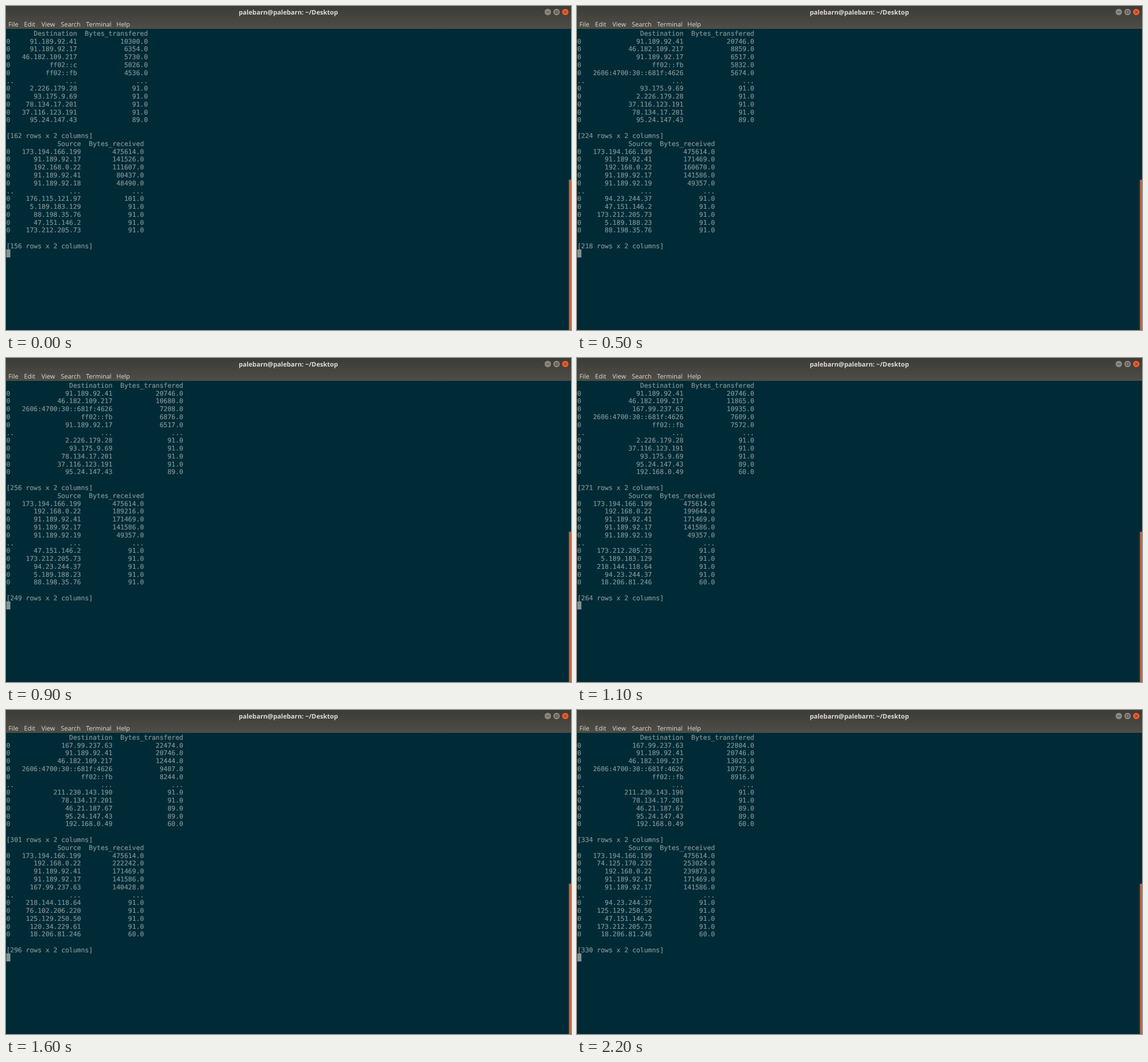
Write an HTML page that moves like this. It is 989 px wide and 567 px high and loops after 2.3 s.

```html
<!DOCTYPE html>
<html lang="en">
<head>
<meta charset="utf-8">
<title>Terminal</title>
<style>
  html, body { margin: 0; width: 100%; height: 100%; overflow: hidden; background: #002b36; }
  svg { position: absolute; left: 0; top: 0; }
  svg text { font: 11px "Open Sans", "Noto Sans", sans-serif; fill: #dfdbd2; text-rendering: geometricPrecision; }
  svg .title { font-weight: 700; font-size: 11.2px; text-anchor: middle; }
  pre {
    position: absolute; left: .4px; top: 41.9px; margin: 0; color: #839496;
    font: 11.44px/13.78px "DejaVu Sans Mono", monospace;
    text-rendering: geometricPrecision;
    -webkit-text-stroke: .2px #839496;
  }
</style>
</head>
<body>
<svg width="989" height="567" viewBox="0 0 989 567">
  <defs>
    <linearGradient id="bar" x1="0" y1="0" x2="0" y2="1">
      <stop offset="0" stop-color="#3c3b37"/>
      <stop offset="1" stop-color="#4f4d46"/>
    </linearGradient>
  </defs>
  <rect width="989" height="40" fill="url(#bar)"/>
  <text class="title" x="494.3" y="14.8">palebarn@palebarn: ~/Desktop</text>
  <g transform="translate(0 35.5)">
    <text x="4.2">File</text>
    <text x="31.6">Edit</text>
    <text x="62">View</text>
    <text x="96">Search</text>
    <text x="140">Terminal</text>
    <text x="193.3">Help</text>
  </g>
  <g stroke="#33322e" stroke-width=".8">
    <circle cx="948.4" cy="10.6" r="6.2" fill="#8b887e"/>
    <circle cx="963.7" cy="10.6" r="6.2" fill="#8b887e"/>
    <circle cx="979" cy="10.6" r="6.2" fill="#ea5a2a"/>
  </g>
  <g stroke="#3c3b37" fill="none">
    <path d="M945.8 10.6h5.2M961.4 8.7h4.6v3.8h-4.6z"/>
    <path d="M977.1 8.7l3.8 3.8m0-3.8l-3.8 3.8"/>
  </g>
  <rect x="985.3" y="304" width="3.7" height="263" fill="#c6623a"/>
  <rect x=".6" y="426" width="7" height="14" fill="#839496"/>
</svg>
<pre id="out"></pre>
<script>
const STEP = 100, LOOP = 2300;
const keys = [0, 5, 7, 11, 14, 18, 22];

// Hosts with byte totals at each key step; a short list holds its last value.
const sent = {
  heads: ["Destination", "Bytes_transfered"],
  rows: [162, 224, 240, 271, 288, 314, 334],
  top: {
    "91.189.92.41": [10300, 20746],
    "91.189.92.17": [6354, 6517],
    "46.182.109.217": [5730, 8859, 9495, 11865, 11927, 12961, 13023],
    "ff02::c": [5026],
    "ff02::fb": [4536, 5832, 6180, 7572, 7920, 8568, 8916],
    "2606:4700:30::681f:4626": [4400, 5674, 6807, 7609, 8455, 10359, 10775],
    "167.99.237.63": [0, 0, 0, 10935, 22144, 22804]
  },
  low: {
    a: "2.226.179.28", b: "93.175.9.69", c: "78.134.17.201", d: "37.116.123.191",
    e: "95.24.147.43", f: "192.168.0.49", g: "211.230.143.190", h: "46.21.187.67"
  },
  lowBytes: { e: 89, h: 89, f: 60 },
  tails: ["abcde", "badce", "cdabe", "adbef", "gchef", "adhef", "gchef"]
};

const received = {
  heads: ["Source", "Bytes_received"],
  rows: [156, 218, 234, 264, 281, 311, 330],
  top: {
    "173.194.166.199": [475614],
    "91.189.92.17": [141526, 141586],
    "192.168.0.22": [111607, 160670, 178787, 199644, 214101, 230383, 239873],
    "91.189.92.41": [80437, 171469],
    "91.189.92.18": [48490],
    "91.189.92.19": [47000, 49357],
    "167.99.237.63": [0, 0, 0, 0, 140428],
    "74.125.170.232": [0, 0, 0, 0, 0, 251232, 253024]
  },
  low: {
    a: "176.115.121.97", b: "5.189.183.129", c: "88.198.35.76", d: "47.151.146.2",
    e: "173.212.205.73", f: "94.23.244.37", g: "5.189.188.23", h: "218.144.118.64",
    i: "18.206.81.246", j: "125.129.250.50", k: "120.34.229.61", l: "76.102.206.220"
  },
  lowBytes: { a: 101, i: 60 },
  tails: ["abcde", "fdegc", "gcdef", "ebhfi", "jkhli", "glfhi", "fjdei"]
};

const keyAt = step => keys.findLastIndex(k => k <= step);

function valueAt(list, step) {
  const i = keyAt(step), last = list.length - 1;
  if (i >= last) return list[last];
  const part = (step - keys[i]) / (keys[i + 1] - keys[i]);
  return Math.round(list[i] + (list[i + 1] - list[i]) * part);
}

// Equal totals have no fixed order, so they rotate between key steps.
function tailAt(t, step) {
  const i = keyAt(step), ids = [...t.tails[i]];
  const ties = ids.filter(id => !t.lowBytes[id]);
  let n = step - keys[i];
  return ids.map(id => {
    const pick = t.lowBytes[id] ? id : ties[n++ % ties.length];
    return [t.low[pick], t.lowBytes[pick] || 91];
  });
}

function table(t, step) {
  const top = Object.entries(t.top)
    .map(([host, list]) => [host, valueAt(list, step)])
    .sort((a, b) => b[1] - a[1])
    .slice(0, 5);
  const cells = ([host, n]) => ["0", host, n + ".0"];
  const lines = [
    ["", ...t.heads],
    ...top.map(cells),
    ["..", "...", "..."],
    ...tailAt(t, step).map(cells)
  ];
  const width = c => Math.max(...lines.map(l => l[c].length));
  const w1 = width(1), w2 = width(2);
  const text = lines.map(l => l[0].padEnd(4) + l[1].padStart(w1) + "  " + l[2].padStart(w2));
  return text.join("\n") + `\n\n[${valueAt(t.rows, step)} rows x 2 columns]\n`;
}

const out = document.getElementById("out");
let shown = -1;

function draw() {
  const step = Math.floor(performance.now() % LOOP / STEP);
  if (step !== shown) {
    out.textContent = table(sent, step) + table(received, step);
    shown = step;
  }
  requestAnimationFrame(draw);
}
draw();
</script>
</body>
</html>
```
